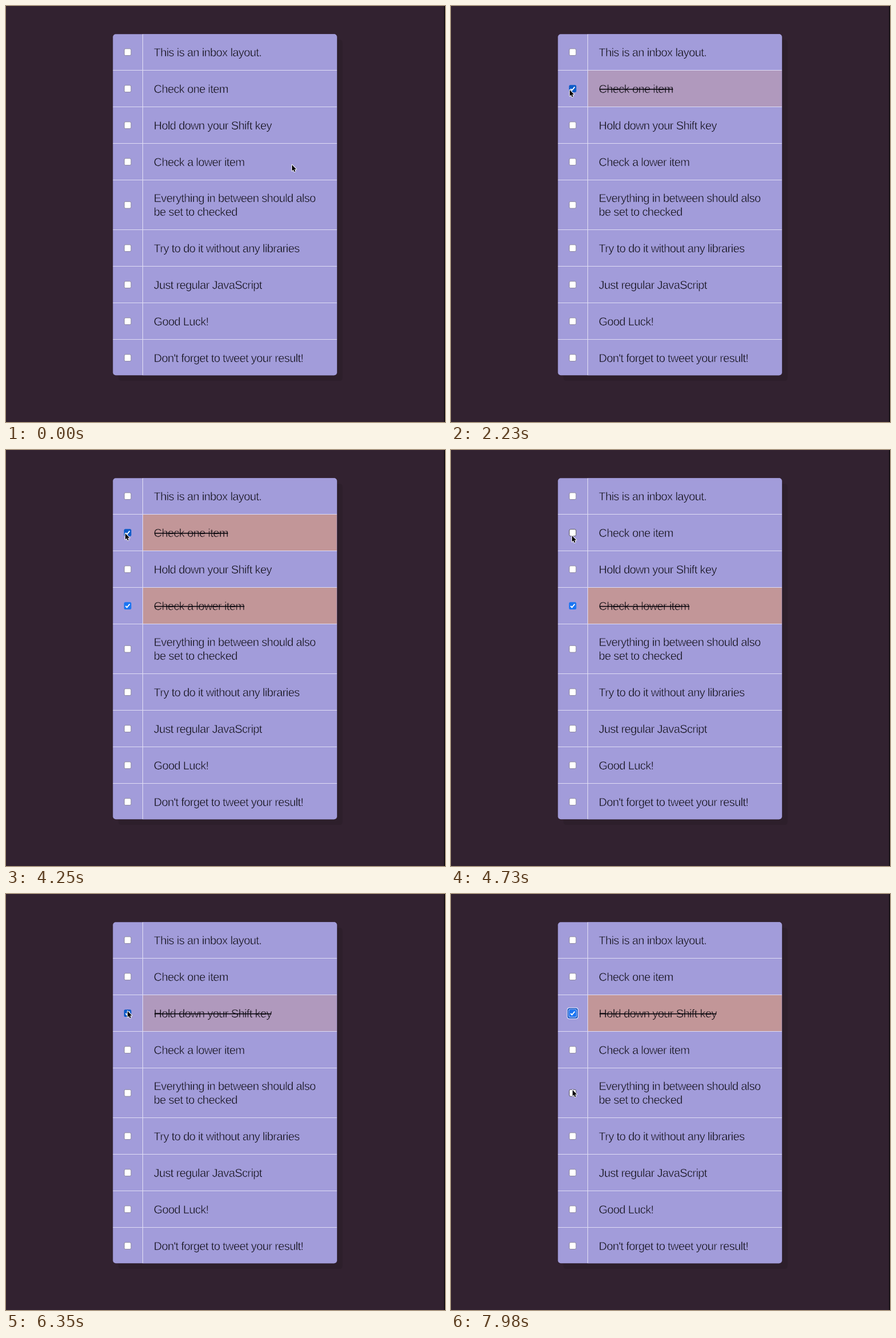
An HTML page with a canvas for the animation above (8000 ms loop, 769 px wide and 728 px high).

```html
<!DOCTYPE html>
<html lang="en">
<head>
<meta charset="utf-8">
<title>Inbox checklist</title>
<style>
  html, body { margin: 0; width: 100%; height: 100%; overflow: hidden; background: #322230; }
  canvas { display: block; }
</style>
</head>
<body>
<canvas id="stage" width="769" height="728"></canvas>
<script>
const ctx = document.getElementById('stage').getContext('2d');
const LOOP = 8000;

const CARD = { x: 187.3, y: 49.2, w: 392.4, h: 597.1, split: 239.5 };
const ROW_HEIGHT = 64, EXTRA_LINE = 23;
const BOX_X = 213.1, TEXT_X = 258.8;
const PANEL = [162, 156, 218], DONE = [194, 150, 152];

const LABELS = [
  'This is an inbox layout.',
  'Check one item',
  'Hold down your Shift key',
  'Check a lower item',
  'Everything in between should also\nbe set to checked',
  'Try to do it without any libraries',
  'Just regular JavaScript',
  'Good Luck!',
  "Don't forget to tweet your result!"
];

let nextTop = 48.5;
const ROWS = LABELS.map(label => {
  const lines = label.split('\n');
  const top = nextTop;
  const height = ROW_HEIGHT + (lines.length - 1) * EXTRA_LINE;
  nextTop += height;
  return { lines, top, height, mid: top + height / 2 + 0.2 };
});

// Pointer moves: start, end, x, y of the tip. It rests in between.
const HOME = { x: 501, y: 278 };
const MOVES = [
  [120, 120, 369, 143], [480, 960, 197, 82], [1160, 1250, 210, 76],
  [1450, 1850, 208, 147], [2325, 2800, 212, 297], [3000, 3370, 216, 273],
  [3674, 4050, 209, 146], [4250, 4440, 212, 150], [4735, 5210, 215, 277.5],
  [5600, 6260, 213, 205], [6450, 7200, 220, 421], [7300, 7980, 213, 343]
];

// Each click on a row toggles it: row, time.
const CLICKS = [[1, 2230], [3, 3674], [1, 4640], [3, 5400], [2, 6350]];
const PRESS = 150, FADE = 160, FADE_HEAD = 0.44;
const FOCUS = { row: 2, from: 6540 };
const BEAM = { from: 320, to: 480 };

const clamp = v => Math.max(0, Math.min(1, v));
const mix = (a, b, p) => a + (b - a) * p;
const ease = p => p * p * (3 - 2 * p);
const rgb = c => `rgb(${c.map(Math.round)})`;

function pointerAt(t) {
  let { x, y } = HOME;
  for (const [start, end, toX, toY] of MOVES) {
    if (t < start) break;
    const p = ease(clamp((t - start) / (end - start || 1) + (end === start)));
    x = mix(x, toX, p);
    y = mix(y, toY, p);
  }
  return { x, y };
}

function rowState(row, t) {
  const times = CLICKS.filter(c => c[0] === row).map(c => c[1]);
  const past = times.filter(time => time <= t);
  const on = past.length % 2 === 1;
  const p = past.length ? clamp((t - past.at(-1)) / FADE + FADE_HEAD) : 1;
  return {
    on,
    color: PANEL.map((c, i) => mix(c, DONE[i], past.length ? (on ? p : 1 - p) : 0)),
    pressed: times.some(time => t >= time - PRESS && t < time)
  };
}

function box(x, y, w, h, r, fill, line) {
  ctx.beginPath();
  ctx.roundRect(x, y, w, h, r);
  ctx.fillStyle = fill;
  ctx.fill();
  if (!line) return;
  ctx.strokeStyle = line;
  ctx.lineWidth = 1;
  ctx.stroke();
}

function polyline(points, color, width) {
  ctx.beginPath();
  points.forEach(([x, y]) => ctx.lineTo(x, y));
  ctx.strokeStyle = color;
  ctx.lineWidth = width;
  ctx.stroke();
}

function drawCheckbox(cy, { on, pressed }, hover, focused) {
  const cx = BOX_X;
  const square = (size, r, fill, line) => box(cx - size / 2, cy - size / 2, size, size, r, fill, line);
  if (focused) {
    square(20, 4, '#e9eafb');
    square(18, 3.5, '#1458c4');
    square(14.6, 3, '#c3cdf5');
  }
  if (on) {
    square(12.8, 2.5, hover || pressed ? '#0c5bc8' : '#1a75f2');
    polyline([[cx - 3.6, cy + 0.3], [cx - 1.2, cy + 2.8], [cx + 3.6, cy - 3]], '#fff', 1.9);
  } else if (pressed) {
    square(11.8, 2.2, '#eeedf4', '#b3b0c4');
  } else {
    square(11.8, 2.2, '#fff', hover ? '#55525f' : '#8a869f');
  }
}

// The outline in the row's own colour thins the letters to a light weight.
function drawLabel({ lines, mid }, { on, color }) {
  ctx.font = '20px "Liberation Sans", Arial, sans-serif';
  ctx.letterSpacing = '-0.61px';
  ctx.textRendering = 'geometricPrecision';
  ctx.lineJoin = 'round';
  ctx.lineWidth = 0.55;
  ctx.fillStyle = '#08060c';
  ctx.strokeStyle = rgb(color);
  lines.forEach((line, i) => {
    const y = mid + (i - (lines.length - 1) / 2) * 23.6;
    ctx.fillText(line, TEXT_X, y + 7);
    ctx.strokeText(line, TEXT_X, y + 7);
    if (on) ctx.fillRect(260, y + 0.2, ctx.measureText(line).width - 1.5, 1.6);
  });
}

function drawArrow({ x, y }) {
  ctx.save();
  ctx.translate(x, y);
  ctx.beginPath();
  [[0, 0], [0, 10.6], [2.4, 8.4], [4, 12.2], [5.8, 11.4], [4.3, 7.8], [7.5, 7.8]]
    .forEach(([px, py]) => ctx.lineTo(px, py));
  ctx.closePath();
  ctx.lineJoin = 'round';
  ctx.strokeStyle = '#f4f3fa';
  ctx.lineWidth = 2;
  ctx.stroke();
  ctx.fillStyle = '#08070a';
  ctx.fill();
  ctx.restore();
}

function drawBeam({ x, y }) {
  const serif = dir => [[x - 2.5, y + dir * 7.5], [x, y + dir * 6], [x + 2.5, y + dir * 7.5]];
  polyline([[x, y - 6.5], [x, y + 6.5]], '#111', 1.1);
  [-1, 1].forEach(dir => polyline(serif(dir), '#111', 1.1));
}

function draw(t) {
  const pointer = pointerAt(t);
  const right = CARD.x + CARD.w, bottom = CARD.y + CARD.h;
  const rule = '#dfdcf4';

  ctx.fillStyle = '#322230';
  ctx.fillRect(0, 0, 769, 728);
  ctx.fillStyle = '#0a070a';
  ctx.fillRect(767.5, 0, 1.5, 728);

  box(CARD.x + 9.8, CARD.y + 9.8, CARD.w, CARD.h, 5, 'rgba(0,0,0,0.1)');
  box(CARD.x, CARD.y, CARD.w, CARD.h, 5, rgb(PANEL));
  ctx.save();
  ctx.clip();

  const states = ROWS.map((_, i) => rowState(i, t));
  ROWS.forEach((row, i) => {
    ctx.fillStyle = rgb(states[i].color);
    ctx.fillRect(CARD.split, row.top, right - CARD.split, row.height);
  });
  ROWS.forEach((row, i) => {
    const hover = Math.hypot(pointer.x - BOX_X, pointer.y - row.mid) < 7.5;
    drawCheckbox(row.mid, states[i], hover, i === FOCUS.row && t >= FOCUS.from);
    drawLabel(row, states[i]);
    if (i) polyline([[CARD.x, row.top], [right, row.top]], rule, 1.1);
  });
  polyline([[CARD.split, CARD.y], [CARD.split, bottom]], rule, 1.1);
  ctx.restore();

  if (t >= BEAM.from && t < BEAM.to) drawBeam(pointer);
  else drawArrow(pointer);
}

const begin = performance.now();
function tick() {
  draw((performance.now() - begin) % LOOP);
  requestAnimationFrame(tick);
}
tick();
</script>
</body>
</html>
```
